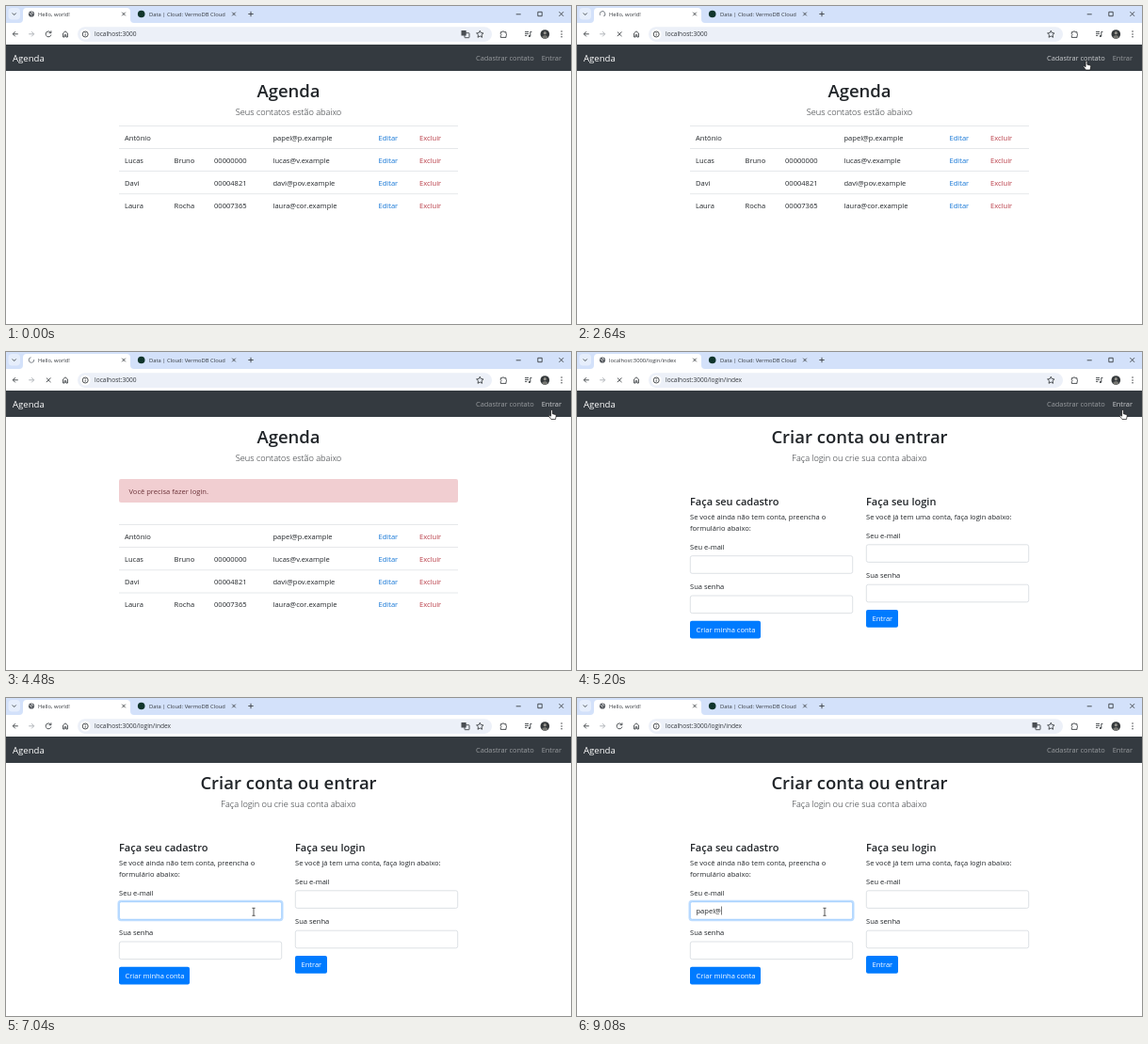
These frames come from a looping animation (600x338 px, 9.12 s). An HTML page:

```html
<!DOCTYPE html>
<html lang="pt-BR">
<head>
<meta charset="utf-8">
<title>Agenda</title>
<style>
html, body { margin: 0; width: 100%; height: 100%; overflow: hidden; background: #fff; }
svg { display: block; width: 100%; height: 100%; }
text { font: 7.55px "Open Sans", "Noto Sans", sans-serif; fill: #212529; white-space: pre; }
.tab { font-size: 5.8px; fill: #33373c; }
.url { font-size: 6.6px; fill: #33373c; }
.brand { font-size: 9.6px; fill: #fff; }
.nav { font-size: 7.4px; }
.h1 { font-size: 18.5px; font-weight: 600; text-anchor: middle; }
.lead { font-size: 9.2px; font-weight: 300; text-anchor: middle; }
.h3 { font-size: 11px; font-weight: 600; }
.edit { fill: #1476d6; }
.del { fill: #b83a45; }
.warn { fill: #6b3238; }
.btn { fill: #fff; }
.icon { fill: none; stroke: #3c4043; stroke-width: .9; }
.cursor { fill: #fff; stroke: #111; stroke-width: .7; stroke-linejoin: round; }
</style>
</head>
<body>
<svg id="stage" viewBox="0 0 600 338"></svg>
<script>
const LOOP = 9120;
const text = (x, y, s, cls = "", id = "") => `<text x="${x}" y="${y}" class="${cls}" id="${id}">${s}</text>`;
const rect = (x, y, w, h, fill, r = 0, more = "") =>
  `<rect x="${x}" y="${y}" width="${w}" height="${h}" rx="${r}" fill="${fill}" ${more}/>`;
const dot = (x, y, r, fill, more = "") => `<circle cx="${x}" cy="${y}" r="${r}" fill="${fill}" ${more}/>`;
const icon = (d, more = "") => `<path class="icon" d="${d}" ${more}/>`;
const cross = (x, y, r, more) =>
  icon(`M${x - r} ${y - r}l${2 * r} ${2 * r}m0 ${-2 * r}l${-2 * r} ${2 * r}`, more);

const browser = () =>
  rect(0, 0, 600, 20, "#d3e1fa") + rect(2.5, 2, 12.5, 12.5, "#e6eefc", 4) +
  icon("M6.7 7.5l2 2 2-2") +
  `<path fill="#fff" d="M14 18q4 0 4-4V6q0-4 4-4H128q4 0 4 4v8q0 4 4 4z"/>` +
  rect(0, 18, 600, 23, "#fff") +
  `<g id="globe">${dot(27, 8.5, 3.1, "#50545a")}${icon("M24.5 7.6l2 .6 .8 2m.4-4.4l-.6 1.3 2.2 1", 'style="stroke:#fff;stroke-width:.7"')}</g>` +
  `<g id="spinner">${icon("M24.2 8.5a2.8 2.8 0 1 0 2.8-2.8", 'style="stroke:#7a8088"')}</g>` +
  text(34, 10.6, "Hello, world!", "tab", "title") + cross(125, 8.5, 1.8) +
  dot(143.7, 8.5, 3.8, "#10352c") + text(152, 10.6, "Data | Cloud: VermoDB Cloud", "tab") +
  cross(242, 8.5, 1.8) + icon("M257.3 8.5h5.4M260 5.8v5.4") +
  icon("M541.7 8.8h5M564.8 6.3h4.4v4.4h-4.4z") + cross(589.7, 8.5, 2.3) +
  icon("M12.8 29.8H7.4m2.5-2.6L7.3 29.8l2.6 2.6") +
  icon("M24.2 29.8h5.4m-2.5-2.6l2.6 2.6-2.6 2.6", 'style="stroke:#aaaeb3"') +
  `<g id="reload">${icon("M47.6 28.4a2.9 2.9 0 1 0 .3 2.2M47.9 26.4v2.3h-2.3")}</g>` +
  cross(45.2, 29.8, 2.3, 'id="stop"') +
  icon("M60.6 33V28.9L63 26.8l2.4 2.1V33h-1.6v-2.3h-1.6V33z") +
  rect(76, 22.3, 440, 15.6, "#ecf0f8", 7.8) + dot(84.2, 30, 5.5, "#fff") +
  dot(84.2, 30, 3, "none", 'class="icon"') + icon("M84.2 29.6v2M84.2 28.1v.8") +
  text(94, 32.3, "localhost:3000", "url", "url") +
  `<g id="translate">${rect(487, 28.7, 5, 5, "none", .5, 'class="icon"')}${rect(483.5, 26, 5.2, 5.4, "#4a4e53", .5)}</g>` +
  icon("M503.3 26.2l1.1 2.4 2.6.3-1.9 1.8.5 2.6-2.3-1.3-2.3 1.3.5-2.6-1.9-1.8 2.6-.3z") +
  icon("M525.3 27.7h1.8q.8-2.4 1.7 0h2.2v2q2 .8 0 1.7v2h-5.7v-1.9q1.5-.8 0-1.7z") +
  icon("M551 27.4h4M551 29.4h4M551 31.4h2.4M556.8 32v-4.6h1.6") + dot(555.9, 32, 1.1, "#3c4043") +
  dot(572.3, 30, 4.8, "#34383a") + dot(572.3, 28.7, 1.6, "#92908b") +
  `<path fill="#777873" d="M569 33.4q.6-2.5 3.3-2.5t3.3 2.5q-3.3 2.3-6.6 0"/>` +
  [27, 29.9, 32.8].map(y => dot(590, y, .75, "#3c4043")).join("") +
  rect(0, 41, 600, 28, "#343a40") + text(7, 59, "Agenda", "brand") +
  text(499, 58.2, "Cadastrar contato", "nav", "register") + text(568.7, 58.2, "Entrar", "nav", "enter");

const contacts = [
  ["Antônio", "", "", "papel@p.example"],
  ["Lucas", "Bruno", "00000000", "lucas@v.example"],
  ["Davi", "", "00004821", "davi@pov.example"],
  ["Laura", "Rocha", "00007365", "laura@cor.example"]
];
const columns = [126, 178.5, 221, 283.5, 395.5, 439];
const row = (cells, i) => {
  const y = 127.3 + i * 24.15;
  return rect(120, y - .25, 360, .6, "#d5d9dd") + [...cells, "Editar", "Excluir"]
    .map((s, c) => text(columns[c], y + 15.4, s, ["", "", "", "", "edit", "del"][c])).join("");
};
const home = () => text(300, 96.6, "Agenda", "h1") + text(300, 116, "Seus contatos estão abaixo", "lead") +
  `<g id="alert">${rect(120, 135, 360, 25, "#f1ced1", 2)}${text(130.5, 150.5, "Você precisa fazer login.", "warn")}</g>` +
  `<g id="table">${contacts.map(row).join("")}</g>`;

const field = (x, y, label, id = "") => text(x, y - 7, label) +
  rect(x + .3, y, 172.4, 18.6, "#fff", 2, `stroke="#ced4da" stroke-width=".7" id="${id}"`);
const button = (x, y, w, s, id = "") => rect(x, y, w, 18.8, "#007bff", 2, `id="${id}"`) +
  text(x + 6.5, y + 12.2, s, "btn");
const login = () => text(300, 96.6, "Criar conta ou entrar", "h1") +
  text(300, 116, "Faça login ou crie sua conta abaixo", "lead") +
  text(120, 162.5, "Faça seu cadastro", "h3") + text(307, 162.5, "Faça seu login", "h3") +
  text(120, 178, "Se você ainda não tem conta, preencha o") + text(120, 190, "formulário abaixo:") +
  text(307, 178, "Se você já tem uma conta, faça login abaixo:") +
  rect(119.3, 215.7, 174.4, 20.6, "none", 2.8, 'id="ring" stroke="#007bff" stroke-opacity=".25" stroke-width="1.7"') +
  field(120, 216.7, "Seu e-mail", "email") + field(120, 259, "Sua senha") +
  field(307, 204.8, "Seu e-mail") + field(307, 247.2, "Sua senha") +
  button(120, 285.7, 75, "Criar minha conta") + button(307, 274, 34, "Entrar", "submit") +
  text(126.5, 228.8, "", "", "typed") + rect(0, 221.5, .6, 9, "#222", 0, 'id="caret"');

const cursors = () => [
  ["arrow", "M0 0v9l2.1-2 1.4 3.2 1.4-.6-1.4-3.1h3z"],
  ["hand", "M-.9 .7q.9-1.3 1.8 0v3.5l3 .8q1 .3.8 1.6l-.7 3.4h-4.6L-3.3 6.4q.5-1.3 2.4.3z"],
].map(([id, d]) => `<path id="${id}" class="cursor" d="${d}"/>`).join("") +
  `<path id="beam" fill="none" stroke="#333" stroke-width=".8" d="M-1.6-4h3.2M0-4v8M-1.6 4h3.2"/>`;

stage.innerHTML = `${rect(0, 0, 600, 338, "#fff")}${browser()}<g id="home">${home()}</g>` +
  `<g id="login">${login()}</g><g id="pointer">${cursors()}</g>`;

const $ = id => document.getElementById(id);
const show = (id, on) => $(id).setAttribute("display", on ? "inline" : "none");
const set = (id, name, value) => $(id).setAttribute(name, value);
const within = (t, a, b) => t >= a && t < b;
const clamp = v => Math.max(0, Math.min(1, v));

// time, x, y of the pointer's hot spot
const path = [
  [40, 400, 241], [920, 500, 110], [1080, 500, 110], [1400, 556, 58], [1480, 568, 57],
  [1680, 578, 58], [1920, 578, 58], [2240, 541, 58], [4080, 541, 58], [4400, 579.5, 61.5],
  [5200, 579.5, 61.5], [5960, 322, 282], [6040, 322, 282], [6280, 263, 227.3]
];
function pointerAt(t) {
  const i = path.findIndex(p => p[0] > t);
  if (i < 0) return path[path.length - 1].slice(1);
  if (!i) return path[0].slice(1);
  const a = path[i - 1], b = path[i], u = (t - a[0]) / (b[0] - a[0]), k = u * u * (3 - 2 * u);
  return [a[1] + (b[1] - a[1]) * k, a[2] + (b[2] - a[2]) * k];
}

const CLICK = 6480, keys = [7200, 7400, 7600, 7800, 8040, 8900], word = "papel@";

function draw(t) {
  const atLogin = t >= 5120, warned = t >= 2760;
  const loading = within(t, 2600, 3040) || within(t, 4480, 5440);
  const untitled = within(t, 2760, 3040) || within(t, 5120, 5440);
  const address = atLogin ? "localhost:3000/login/index" : "localhost:3000";
  $("url").textContent = address;
  $("title").textContent = untitled ? address : "Hello, world!";
  const waiting = loading && !untitled;
  show("globe", !waiting);
  show("spinner", waiting);
  set("spinner", "transform", `rotate(${Math.min(t, 4560) * .5} 27 8.5)`);
  show("reload", !loading);
  show("stop", loading);
  show("translate", !loading);

  show("home", !atLogin);
  show("login", atLogin);
  show("alert", warned);
  set("table", "transform", `translate(0 ${warned ? 56.2 : 0})`);

  const hot = within(t, 1360, 1500) || within(t, 2040, 2680) ? "register" :
    within(t, 1500, 2040) || within(t, 4240, 5360) ? "enter" : "";
  for (const id of ["register", "enter"]) $(id).style.fill = id === hot ? "#ccced0" : "#999c9f";

  const [x, y] = pointerAt(t);
  const overButton = atLogin && x > 307 && x < 341 && y > 274 && y < 293;
  const overField = atLogin && x > 120 && x < 293 && y > 216 && y < 236;
  const hand = overButton || (y < 68 && x > 495);
  show("pointer", t >= 40);
  set("pointer", "transform", `translate(${x} ${y})`);
  show("beam", overField);
  show("hand", hand);
  show("arrow", !hand && !overField);
  set("submit", "fill", overButton ? "#0069d9" : "#007bff");

  const focus = clamp((t - CLICK) / 150);
  set("ring", "opacity", focus);
  set("email", "stroke", focus > .5 ? "#80bdff" : "#ced4da");
  const count = keys.filter(k => k <= t).length;
  $("typed").textContent = word.slice(0, count);
  const since = t - (count ? keys[count - 1] : CLICK);
  show("caret", since >= 0 && since % 1060 < 530);
  if (atLogin) set("caret", "x", 126.7 + (count ? $("typed").getComputedTextLength() : 0));
}

const start = performance.now();
function frame() {
  draw((performance.now() - start) % LOOP);
  requestAnimationFrame(frame);
}
frame();
</script>
</body>
</html>
```
